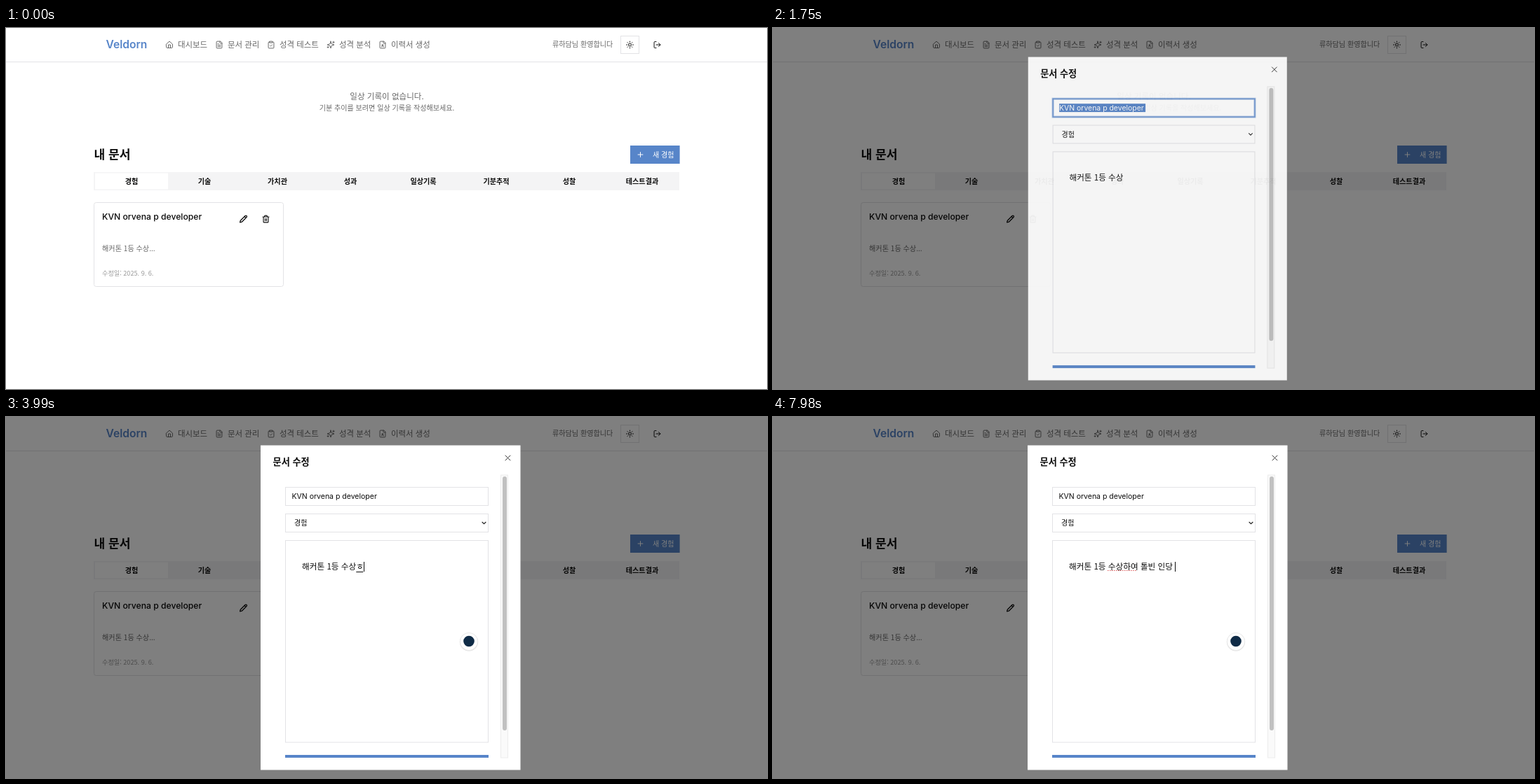
Animation, 1085 px wide and 516 px high, one loop 8000 ms. Source, as an HTML page:

```html
<!DOCTYPE html>
<html lang="ko">
<head>
<meta charset="utf-8">
<style>
  html, body { margin: 0; width: 100%; height: 100%; overflow: hidden; background: #fff; }
  svg { display: block; width: 100%; height: 100%; }
  text { font-family: "Noto Sans CJK KR", "Noto Sans CJK", sans-serif; white-space: pre; }
  .latin { font-family: Inter, "Noto Sans", sans-serif; }
</style>
</head>
<body>
<svg id="stage" viewBox="0 0 1085 516"></svg>
<script>
const LOOP = 8000;
const BLUE = '#5785c9', LINE = '#e3e3e6', GRAY = '#686868', INK = '#0c0c0c';
const DOC_TITLE = 'KVN orvena p developer';
const BODY = '해커톤 1등 수상';

const FILE = 'M15 2H6a2 2 0 0 0-2 2v16a2 2 0 0 0 2 2h12a2 2 0 0 0 2-2V7ZM14 2v4a2 2 0 0 0 2 2h4';
const ICONS = {
  home: 'M9 21v-9h6v9M3 10l9-8 9 8v9a2 2 0 0 1-2 2H5a2 2 0 0 1-2-2z',
  file: FILE + 'M10 9H8M16 13H8M16 17H8',
  clipboard: 'M8 2h8v4H8zM16 4h2a2 2 0 0 1 2 2v14a2 2 0 0 1-2 2H6a2 2 0 0 1-2-2V6a2 2 0 0 1 2-2h2M9 14l2 2 4-4',
  sparkles: 'M12 2l2 7 8 3-8 3-2 7-2-7-8-3 8-3ZM20 2v5M22.5 4.5h-5M4 17v4M6 19H2',
  profile: FILE + 'M10 13a2 2 0 1 0 4 0a2 2 0 1 0-4 0M15 18a3 3 0 0 0-6 0',
  sun: 'M8 12a4 4 0 1 0 8 0a4 4 0 1 0-8 0M12 2v2M12 20v2M5 5l1.4 1.4M17.6 17.6L19 19M2 12h2M20 12h2M6.4 17.6L5 19M19 5l-1.4 1.4',
  logout: 'M9 21H5a2 2 0 0 1-2-2V5a2 2 0 0 1 2-2h4M16 17l5-5-5-5M21 12H9',
  pencil: 'M17 3a2.85 2.83 0 1 1 4 4L7.5 20.5 2 22l1.5-5.5ZM15 5l4 4',
  trash: 'M3 6h18M19 6v14a2 2 0 0 1-2 2H7a2 2 0 0 1-2-2V6M8 6V4a2 2 0 0 1 2-2h4a2 2 0 0 1 2 2v2M10 11v6M14 11v6',
  plus: 'M5 12h14M12 5v14',
  close: 'M5 5l14 14M19 5L5 19',
  chevron: 'M6 9l6 6 6-6'
};

// Text is placed by the vertical centre of its line.
const text = (x, cy, size, str, fill = INK, attrs = '') =>
  `<text x="${x}" y="${cy + size * 0.37}" font-size="${size}" fill="${fill}" ${attrs}>${str}</text>`;
const rect = (x, y, w, h, fill, attrs = '') =>
  `<rect x="${x}" y="${y}" width="${w}" height="${h}" fill="${fill}" ${attrs}/>`;
const icon = (name, cx, cy, color = INK, size = 11.8, weight = 2) =>
  `<path d="${ICONS[name]}" transform="translate(${cx - size / 2} ${cy - size / 2}) scale(${size / 24})"
    fill="none" stroke="${color}" stroke-width="${weight}" stroke-linecap="round" stroke-linejoin="round"/>`;
const outline = `stroke="${LINE}"`;
const bold = 'font-weight="700"', medium = 'font-weight="600"', middle = 'text-anchor="middle"';

const nav = [
  ['home', 233, 245, '대시보드'], ['file', 304, 316, '문서 관리'],
  ['clipboard', 378, 390, '성격 테스트'], ['sparkles', 463, 475, '성격 분석'],
  ['profile', 537, 549, '이력서 생성']
].map(([name, cx, x, label]) => icon(name, cx, 24, GRAY) + text(x, 23.5, 11.45, label, GRAY)).join('');

const tabs = ['경험', '기술', '가치관', '성과', '일상기록', '기분추적', '성찰', '테스트결과']
  .map((label, i) => text(179 + i * 104, 218.8, 10.1, label, INK, `${middle} ${medium}`)).join('');

const page = `
  ${rect(0, 0, 1085, 516, '#fff')}
  ${rect(0, 48, 1085, 1, LINE)}
  ${text(142.5, 23.5, 15.6, 'Veldorn', BLUE, `class="latin" ${medium}`)}
  ${nav}
  ${text(779, 23.5, 10.1, '류하담님 환영합니다', GRAY)}
  ${rect(876.5, 11.5, 26, 25, '#fff', outline)}
  ${icon('sun', 889.5, 24)}${icon('logout', 928.5, 24)}
  ${text(543, 98, 11.55, '일상 기록이 없습니다.', GRAY, middle)}
  ${text(543, 114.5, 10.06, '기분 추이를 보려면 일상 기록을 작성해보세요.', GRAY, middle)}
  ${text(125.5, 180.5, 17.1, '내 문서', INK, bold)}
  ${rect(890, 168, 70.6, 26, BLUE)}
  ${icon('plus', 904.5, 181, '#fff')}
  ${text(922, 181, 10.06, '새 경험', '#fff')}
  ${rect(125, 206, 835, 26, '#f4f4f5')}${rect(127, 207.5, 104, 23, '#fff')}
  ${tabs}
  ${rect(125.5, 249.5, 270, 120, '#fff', `${outline} rx="3"`)}
  ${text(137, 269.5, 12.2, DOC_TITLE, INK, 'class="latin" font-weight="500"')}
  ${icon('pencil', 338.5, 273, INK, 11.8, 2.6)}${icon('trash', 370.5, 273, INK, 11.8, 2.3)}
  ${text(137, 315, 10.15, '해커톤 1등 수상...', GRAY)}
  ${text(137, 351, 9.15, '수정일: 2025. 9. 6.', '#999')}`;

const dialog = `
  ${rect(363, 40.5, 370.5, 464, '#fff')}
  ${text(380.5, 64.5, 13.2, '문서 수정', INK, bold)}
  ${icon('close', 715.5, 58.5, '#333')}
  ${rect(705.5, 83, 10, 404, '#fafafa', 'stroke="#ececec"')}
  ${rect(708, 85, 6, 363, '#c1c1c1', 'rx="3"')}
  ${rect(398.5, 100.5, 289, 26, '#fff', outline)}
  <g id="ring">
    ${rect(398.5, 100.5, 289, 26, 'none', 'stroke="#a9c1e4" stroke-width="3"')}
    ${rect(398.5, 100.5, 289, 26, 'none', `stroke="${BLUE}"`)}
  </g>
  ${rect(407.5, 107.5, 123.5, 12, BLUE, 'id="selection"')}
  ${text(407.5, 113.5, 10.5, DOC_TITLE, INK, 'id="title" class="latin"')}
  ${rect(398.5, 138.5, 289, 26, '#fff', outline)}
  ${text(411, 151.5, 10, '경험')}
  ${icon('chevron', 681.5, 151.5, '#222', 10, 2.6)}
  ${rect(398.5, 176.5, 289, 288.5, '#fff', outline)}
  ${text(422, 213.5, 11.65, BODY, INK, 'id="body"')}
  <path id="spelling" d="M477 219.5H519" stroke="#e05a5a" stroke-dasharray="1.5 1.5"/>
  ${rect(0, 221, 10, 1, INK, 'id="composing"')}
  ${rect(0, 207, 1, 14, INK, 'id="caret"')}
  <g id="helper">
    <circle cx="660" cy="321.5" r="13.2" fill="#000" opacity=".1"/>
    <circle cx="660" cy="321" r="12.5" fill="#fff" stroke="#e6e6e6" stroke-width=".7"/>
    <circle cx="660" cy="320.5" r="7.8" fill="#0f2b46"/>
  </g>
  ${rect(398, 483, 290, 4, BLUE)}`;

document.getElementById('stage').innerHTML =
  `${page}${rect(0, 0, 1085, 516, '#000', 'id="shade"')}<g id="dialog">${dialog}</g>`;

// Steps are [start time, value]; typed text marks a syllable being composed with "|".
const OPENING = [[0, 0], [1680, 0.75], [1750, 0.92], [1820, 1]];
const SHADE = [[0, 0], [1680, 0.455], [1750, 0.5]];
const RING = [[0, 1], [2380, 0.7], [2450, 0.35], [2520, 0.1], [2590, 0]];
const HELPER = [[0, 0], [2450, 0.4], [2520, 0.8], [2590, 1]];
const TYPING = [
  [0, ''], [3010, 'g'], [3220, 'gk'], [3570, 'g'], [3640, ''],
  [3990, '|ㅎ'], [4340, '|하'], [4480, '하|ㅇ'], [4550, '하|여'], [4620, '하여 '],
  [5040, '하여 |ㅌ'], [5110, '하여 |토'], [5180, '하여 |톨'],
  [5460, '하여 톨|ㅂ'], [5950, '하여 톨|비'], [6090, '하여 톨'], [6230, '하여 '],
  [6300, '하여 |ㅌ'], [6440, '하여 |토'], [6580, '하여 |톨'],
  [6650, '하여 톨|ㅂ'], [6790, '하여 톨|비'], [6860, '하여 톨|빈'], [7000, '하여 톨빈 '],
  [7420, '하여 톨빈 |ㅇ'], [7490, '하여 톨빈 |이'], [7560, '하여 톨빈 |인'],
  [7630, '하여 톨빈 인|ㄷ'], [7770, '하여 톨빈 인|다'], [7840, '하여 톨빈 인|당'],
  [7980, '하여 톨빈 인당 ']
];
const at = (steps, t) => steps.findLast(([start]) => start <= t)[1];

const $ = id => document.getElementById(id);
const set = (id, attrs) => { for (const key in attrs) $(id).setAttribute(key, attrs[key]); };
const show = (id, visible) => set(id, { visibility: visible ? 'inherit' : 'hidden' });

function draw(t) {
  const open = at(OPENING, t), scale = 0.95 + 0.05 * open;
  set('shade', { opacity: at(SHADE, t) });
  set('dialog', {
    opacity: open,
    transform: `translate(548.25 272.5) scale(${scale}) translate(-548.25 -272.5)`
  });

  const editing = t >= 2380;
  set('ring', { opacity: at(RING, t) });
  set('helper', { opacity: at(HELPER, t) });
  set('title', { fill: editing ? INK : '#fff' });
  show('selection', !editing);

  const typed = at(TYPING, t), [done, syllable] = typed.split('|');
  $('body').textContent = BODY + done + (syllable || '');
  const end = 422 + $('body').getComputedTextLength();
  set('caret', { x: Math.round(end) });
  set('composing', { x: end - 10.7 });
  show('caret', editing && !(t >= 2870 && t < 3010));
  show('composing', syllable);
  show('spelling', t >= 4620);
}

function tick() {
  draw(performance.now() % LOOP);
  requestAnimationFrame(tick);
}
tick();
</script>
</body>
</html>
```
